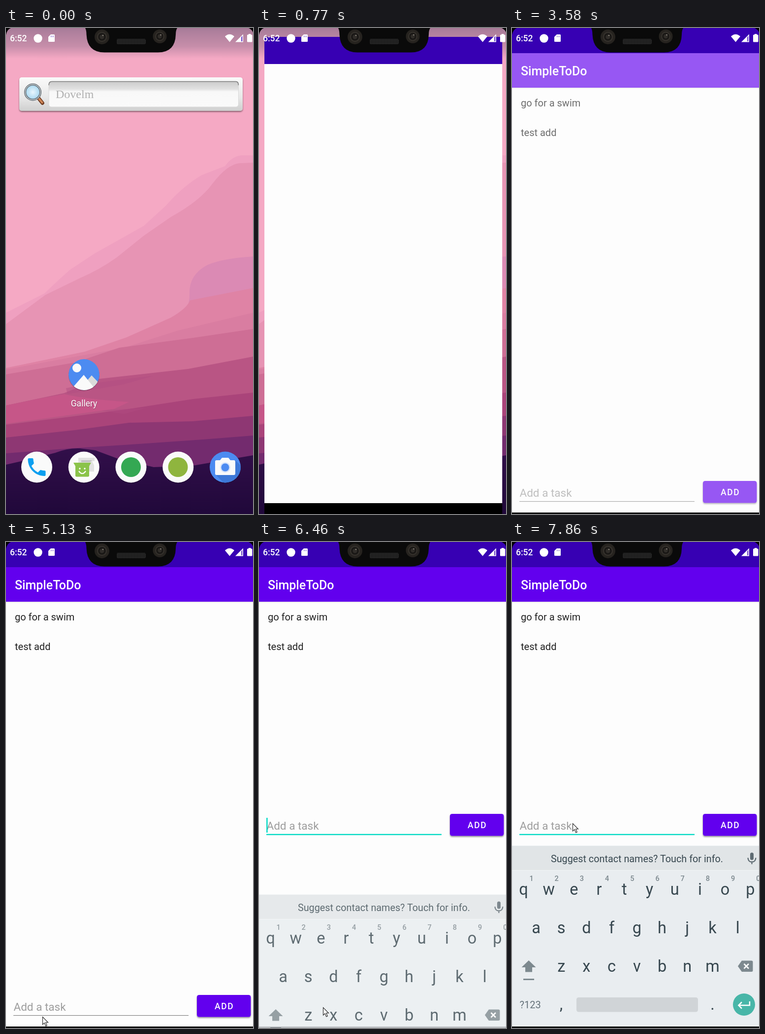
An HTML page that plays this animation: 502x985 px, repeating every 8 s.

```html
<!DOCTYPE html>
<html lang="en">
<head>
<meta charset="utf-8">
<title>To-do app demo</title>
<style>
html, body { margin: 0; width: 100%; height: 100%; overflow: hidden; background: #000; }
svg { display: block; width: 100%; height: 100%; }
text { font-family: Roboto, sans-serif; }
.med { font-weight: 500; }
.mid { text-anchor: middle; }
</style>
</head>
<body>
<svg viewBox="0 0 502 985" preserveAspectRatio="none">
<defs>
  <linearGradient id="dim" x2="0" y2="1">
    <stop stop-color="#3c3c5c" stop-opacity=".42"/><stop offset=".6" stop-color="#3c3c5c" stop-opacity=".25"/><stop offset="1" stop-color="#3c3c5c" stop-opacity="0"/>
  </linearGradient>
  <linearGradient id="panel" x2="0" y2="1"><stop stop-color="#fafafa"/><stop offset=".6" stop-color="#e8e8e8"/><stop offset="1" stop-color="#cfcfcf"/></linearGradient>
  <linearGradient id="well" x2="0" y2="1"><stop stop-color="#cbcbcb"/><stop offset=".3" stop-color="#e2e2e2"/><stop offset=".4" stop-color="#f8f8f8"/><stop offset="1" stop-color="#fafafa"/></linearGradient>
  <linearGradient id="ground" x2="0" y2="1"><stop stop-color="#320f4a"/><stop offset="1" stop-color="#20083a"/></linearGradient>
  <radialGradient id="lens"><stop stop-color="#e9f6fd"/><stop offset="1" stop-color="#a5d6ef"/></radialGradient>
  <pattern id="mesh" width="3" height="3" patternUnits="userSpaceOnUse"><rect width="3" height="3" fill="#151515"/><circle cx="1.5" cy="1.5" r=".9" fill="#3c3c3c"/></pattern>
  <filter id="soft" x="-20%" y="-20%" width="140%" height="150%"><feDropShadow dx="0" dy="2" stdDeviation="1.5" flood-opacity=".45"/></filter>
  <clipPath id="disc"><circle cx="158.5" cy="702.5" r="31.5"/></clipPath>
  <clipPath id="camDisc"><circle cx="445.5" cy="890" r="31.5"/></clipPath>
</defs>

<g id="home">
  <rect width="502" height="985" fill="#f5a9c4"/>
  <g id="ridges"></g>
  <path d="M122 730Q180 718 300 705L240 722L125 742ZM190 775L285 770L240 782Z" fill="#b04d80" opacity=".45"/>
  <path d="M0 765Q60 752 118 742Q160 752 250 758L220 772L0 802Z" fill="#c65688"/>
  <rect width="502" height="62" fill="url(#dim)"/>

  <g filter="url(#soft)"><rect x="27" y="100" width="454" height="68" rx="5" fill="url(#panel)"/></g>
  <rect x="87" y="108.5" width="385.500" height="51.500" rx="5" fill="url(#well)" stroke="#d8d8d8"/>
  <path d="M87 116Q87 108.500 93 108.500H467Q472.500 108.500 472.500 116" fill="none" stroke="#7d7d7d" stroke-width="1.500"/>
  <path d="M66 142L74 152" stroke="#6e3b22" stroke-width="7.500" stroke-linecap="round"/>
  <path d="M66 142L73.500 151" stroke="#cf8657" stroke-width="4" stroke-linecap="round"/>
  <circle cx="54.500" cy="130" r="15.500" fill="url(#lens)" stroke="#555f66" stroke-width="4"/>
  <circle cx="54.500" cy="130" r="15.500" fill="none" stroke="#cfd6da" stroke-width="1.500"/>
  <text x="101" y="142" font-size="24" fill="#b0b0b0" style="font-family:'Liberation Serif',serif">Dovelm</text>

  <circle cx="158.500" cy="704" r="31.500" opacity=".22"/>
  <g clip-path="url(#disc)">
    <circle cx="158.500" cy="702.500" r="31.500" fill="#4c8bf1"/>
    <circle cx="144" cy="689" r="9" fill="#fafafa"/>
    <path d="M160 720L174 704L195 726V740H160Z" fill="#dadada"/>
    <path d="M130 735L158 703L184 735Z" fill="#fafafa"/>
  </g>
  <text class="mid" x="159" y="767.500" font-size="17.500" fill="#5a2040" opacity=".5">Gallery</text>
  <text class="mid" x="158.500" y="766.500" font-size="17.500" fill="#fff">Gallery</text>

  <g id="dock"></g>
  <path transform="translate(38.500 866) scale(2)" fill="#0b9ff0" d="M6.620 10.790c1.440 2.830 3.760 5.140 6.590 6.590l2.200-2.200c.27-.27.67-.36 1.020-.24 1.120.37 2.330.57 3.570.57.55 0 1 .45 1 1V20c0 .55-.45 1-1 1-9.390 0-17-7.610-17-17 0-.55.45-1 1-1h3.500c.55 0 1 .45 1 1 0 1.250.2 2.450.57 3.570.11.35.03.74-.25 1.020l-2.200 2.200z"/>
  <path d="M147 871H180V878H175L179 886V899H147Z" fill="#e2e2e2"/>
  <path d="M153 876H175L171 880H153Z" fill="#c4c4c4"/>
  <path d="M137 881H173L169 888V907Q169 909.500 166 909.500H144Q141 909.500 141 907V888Z" fill="#8bc34a"/>
  <path d="M148 898Q155 908 162 898" fill="none" stroke="#fff" stroke-width="2.200"/>
  <circle cx="150" cy="893" r="1.700" fill="#fff"/><circle cx="160" cy="893" r="1.700" fill="#fff"/>
  <circle cx="254" cy="890" r="20" fill="#34a853"/>
  <circle cx="349.500" cy="890" r="20" fill="#8fb53e"/>
  <g clip-path="url(#camDisc)">
    <path d="M466 876L490 900V930H450L427 906Z" fill="#3d78d8"/>
    <path d="M428 876H435L439 871H452L456 876H463Q466 876 466 879V903Q466 906 463 906H428Q425 906 425 903V879Q425 876 428 876Z" fill="#fafafa"/>
    <circle cx="445.500" cy="890.500" r="10.500" fill="#d5e3fb"/><circle cx="445.500" cy="890.500" r="8" fill="#4c8bf1"/>
  </g>
</g>

<g id="launch">
  <rect id="navBar"/>
  <rect id="sheet" fill="#fdfdfd"/>
  <rect id="topBar" fill="#3700b3"/>
</g>

<g id="app">
  <rect width="502" height="985" fill="#fdfdfd"/>
  <rect y="982" width="502" height="3"/>
  <g id="content">
    <rect y="121" width="502" height="2" fill="#000" opacity=".07"/>
    <rect y="51" width="502" height="70" fill="#6200ee"/>
    <text class="med" x="18" y="95.500" font-size="25" fill="#fff">SimpleToDo</text>
    <g font-size="20" fill="#212121"><text x="18" y="158.500">go for a swim</text><text x="18" y="218.500">test add</text></g>
    <g id="entry">
      <text x="15.500" y="950" font-size="22.500" fill="#9d9d9d">Add a task</text>
      <rect id="line" x="15" width="356"/>
      <rect id="caret" x="15" y="926" width="2.500" height="30" fill="#03dac5"/>
      <g filter="url(#soft)"><rect x="388" y="918" width="109.500" height="44.500" rx="4.500" fill="#6200ee"/></g>
      <text class="med" x="424" y="947" font-size="17.500" letter-spacing="1.560" fill="#fff">ADD</text>
    </g>
  </g>
  <rect width="502" height="51" fill="#3700b3"/>
</g>

<g id="keyboard" fill="#37474f">
  <rect y="615" width="502" height="51" fill="#e1e5e7"/>
  <rect y="665" width="502" height="317" fill="#e9edf0"/>
  <path d="M0 615.500H502M0 665.500H502" stroke="#f2f5f6"/>
  <text class="mid" x="254" y="649" font-size="19.800">Suggest contact names? Touch for info.</text>
  <g stroke="#5f6c73" fill="none" stroke-width="2.300"><path d="M479.500 640Q480 648.500 487.500 648.500T495.500 640M487.500 648V653"/><path d="M487.500 633V641" stroke-width="7" stroke-linecap="round"/></g>
  <g id="keys"></g>
  <path d="M34 848L48.500 862H41V871.500H27V862H19.500ZM23 885H45V888H23Z" fill="#7d898f"/>
  <path d="M467 848.500H486.500Q489.500 848.500 489.500 851V868.500Q489.500 871 486.500 871H467L459 859.800Z" fill="#7d898f"/>
  <path d="M471.500 855L481 864.500M481 855L471.500 864.500" stroke="#fff" stroke-width="2.600"/>
  <text x="15.500" y="945" font-size="20" fill="#65727a">?123</text>
  <rect x="131" y="923" width="247" height="29.500" rx="4.500" fill="#d0d4d7"/>
  <circle cx="471.500" cy="937.500" r="22.500" fill="#48b6a8"/>
  <path d="M483 931V939H461M467 932.500L460.500 939L467 945.500" fill="none" stroke="#fff" stroke-width="2.500"/>
</g>

<g id="status" fill="#fff">
  <text class="med" x="8" y="27" font-size="17.500">6:52</text>
  <circle cx="65" cy="21" r="8.700"/>
  <path d="M91 13H97.500Q99 13 99 14.500V26.500Q99 28 97.500 28H87.500Q86 28 86 26.500V18Z"/>
  <path d="M91.500 15.500V18.500M94 15.500V18.500M96.500 15.500V18.500" stroke="#3700b3" stroke-opacity=".6"/>
  <path d="M445 17Q454.500 8.500 464 17L454.500 28.500Z"/>
  <path d="M466 28.500L482 12.500V28.500Z"/>
  <path d="M478 18.500L480.500 16V27H478Z" fill="#3700b3" fill-opacity=".7"/>
  <path d="M493 12H497.500V13.500H499Q500.500 13.500 500.500 15V27Q500.500 28.500 499 28.500H491.500Q490 28.500 490 27V15Q490 13.500 491.500 13.500H493Z"/>
</g>
<g id="notch">
  <path d="M0 0H10Q2 3 0 14ZM502 0H493Q500 3 502 9Z"/>
  <path d="M161 0Q163.500 5 163.500 13Q165 49.500 200 49.500H309Q344 49.500 345 13Q345 5 348 0Z" fill="#0a0a0a"/>
  <rect x="225" y="22" width="59" height="11" rx="3" fill="url(#mesh)"/>
</g>
<path id="pointer" d="M.5.5V16L4 12.700L6.800 19L9.300 18L6.600 11.800H11.500Z" fill="#fff" stroke="#222" stroke-width="1.100"/>
</svg>

<script>
const LOOP = 8000;
const $ = id => document.getElementById(id);
const set = (id, attrs) => { for (const k in attrs) $(id).setAttribute(k, attrs[k]); };
const show = (id, on) => { $(id).style.display = on ? '' : 'none'; };

// Wallpaper layers: colour and top edge, each filled down to the bottom
const ridges = [
  ['#efa0c0', 'M0 577L78 538Q105 512 130 490L180 457L280 401L325 360Q360 320 398 298L445 280Q460 259 480 258H502'],
  ['#e794b4', 'M0 600L80 541L150 507Q190 490 225 465L280 421L335 383Q395 350 420 315Q450 276 475 274L502 273'],
  ['#db8ab4', 'M350 600Q373 570 373 540Q371 500 410 480Q440 467 502 463'],
  ['#df83a5', 'M0 689L160 656L245 627L335 587Q368 568 374 552L502 527'],
  ['#d97da1', 'M0 692L120 670L240 648L350 613L502 577'],
  ['#ce6e95', 'M0 702L140 678L230 648L380 628L502 610'],
  ['#b95584', 'M0 765L118 740L190 711L370 691L502 666'],
  ['#aa447a', 'M0 804L130 788L250 772L380 752L502 739'],
  ['#8e3773', 'M0 830L140 815L250 800L380 797L502 786'],
  ['#732b6e', 'M0 862L130 852L270 843L400 834L502 826'],
  ['url(#ground)', 'M0 885L40 876L100 861Q125 851 150 852L182 856L225 872L300 890L380 887L502 866']
];
$('ridges').innerHTML = ridges.map(([c, d]) => `<path d="${d}V985H0Z" fill="${c}"/>`).join('');

$('dock').innerHTML = [0, 1, 2, 3, 4].map(i => {
  const x = 62.5 + 95.75 * i;
  return `<circle cx="${x}" cy="891.5" r="31.5" opacity=".2"/>` +
    `<circle cx="${x}" cy="890" r="31.5" fill="${i < 4 ? '#fafafa' : '#4c8bf1'}"/>`;
}).join('');

const key = (s, x, y, size = 32.5, more = '') =>
  `<text class="mid" x="${x}" y="${y}" font-size="${size}" ${more}>${s}</text>`;
const row = (s, x, y) => [...s].map((c, i) => key(c, x + 51.2 * i, y)).join('');
$('keys').innerHTML =
  row('qwertyuiop', 23.5, 715) + row('asdfghjkl', 49, 793) + row('zxcvbnm', 100.2, 871) +
  [...'1234567890'].map((c, i) => key(c, 39.5 + 51.2 * i, 687, 14.5, 'font-weight="500" fill="#7b878d"')).join('') +
  key(',', 100, 948) + key('.', 407.5, 948);

const camera = (x, y, r) => [[r, '#26231f'], [r * .68, '#35312c'], [r * .52, '#191715'], [r * .3, '#302d29']]
  .map(([q, c]) => `<circle cx="${x}" cy="${y}" r="${q}" fill="${c}"/>`).join('') +
  `<circle cx="${x + 2}" cy="${y - 3}" r="1.3" fill="#8b857c"/>`;
$('notch').innerHTML += camera(195, 18, 15) + camera(312.5, 17, 14);

// Stepped tracks: [time, value...]; the latest entry holds
const windowTrack = [[500, 20, 35, 91, 942, .76], [770, 11, 18, 73, 963, 1], [920, 1, 2, 53, 980, 1]];
const pointerTrack = [
  [5130, 74, 962], [5280, 127, 976], [5430, 129, 967], [5550, 130, 961], [5700, 130, 951], [5850, 130, 943],
  [7290, 135, 690], [7410, 132, 589], [7560, 127, 559], [7710, 126, 552], [7860, 123, 570]
];
const keyboardTrack = [[6460, 99, .8], [6585, 27, .95], [6710, 0, 1]];
const at = (track, t) => track.filter(k => k[0] <= t).pop();

function draw(t) {
  const inApp = t >= 1040;
  show('home', !inApp);
  show('app', inApp);

  const win = at(windowTrack, t);
  show('launch', win && !inApp);
  if (win) {
    const [, x, top, bar, bottom, alpha] = win;
    const width = 502 - x - Math.min(x * .7, 14);
    set('navBar', { x, y: bottom, width, height: 985 - bottom });
    set('sheet', { x, y: bar, width, height: bottom - bar });
    set('topBar', { x, y: top, width, height: bar - top });
    set('launch', { opacity: alpha });
  }

  show('content', t >= 3580);
  set('content', { opacity: t < 3730 ? .65 : 1 });

  const focused = t >= 5970;
  set('line', focused
    ? { y: 958.7, height: 2.4, fill: '#03dac5' }
    : { y: 959, height: 1.1, fill: '#7c7c7c' });
  show('caret', t >= 6090 && (t < 6585 || (t >= 7120 && t < 7710)));
  set('entry', { transform: `translate(0 ${t >= 6460 ? -367 : 0})` });

  const kb = at(keyboardTrack, t);
  show('keyboard', kb);
  if (kb) set('keyboard', { transform: `translate(0 ${kb[1]})`, opacity: kb[2] });

  const p = at(pointerTrack, t);
  show('pointer', p);
  if (p) set('pointer', { transform: `translate(${p[1]} ${p[2]})` });
}

const start = performance.now();
function tick() {
  draw((performance.now() - start) % LOOP);
  requestAnimationFrame(tick);
}
tick();
</script>
</body>
</html>
```
